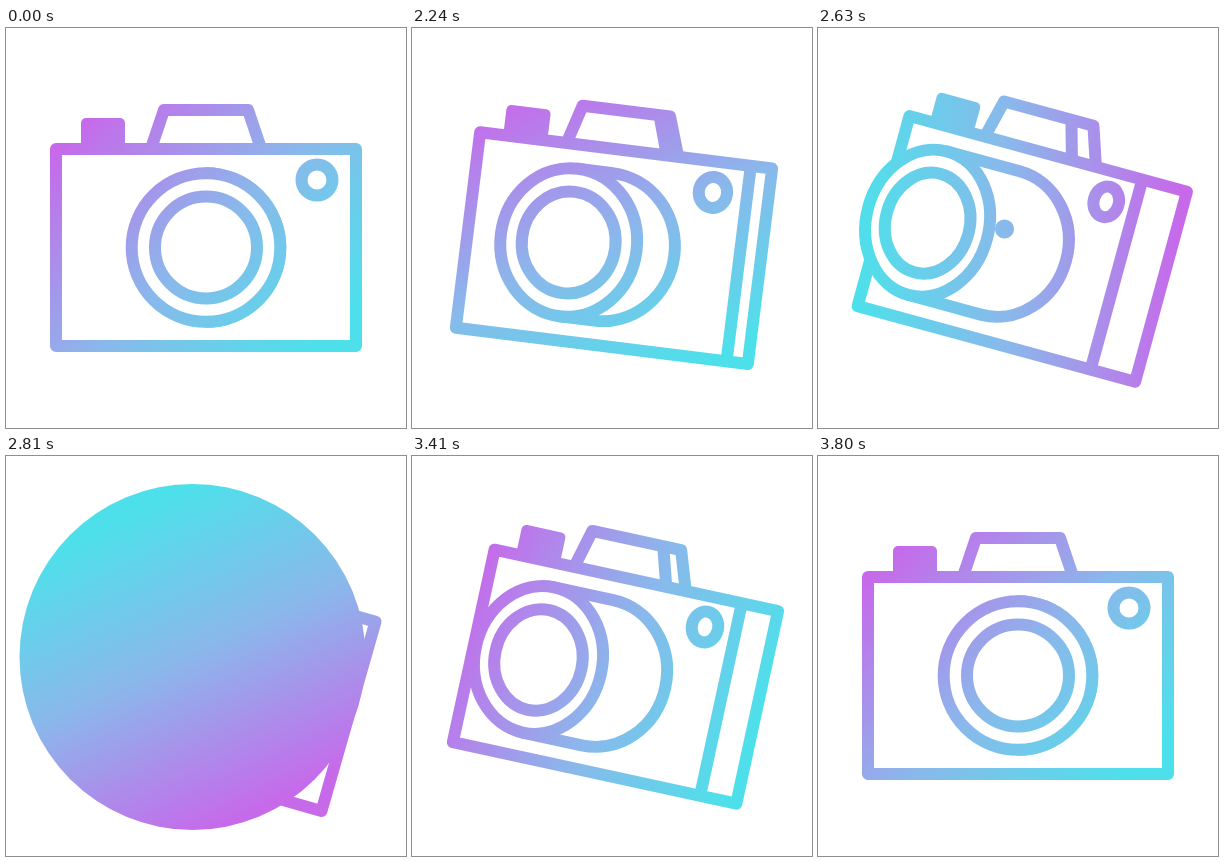
An HTML page for the animation above (3830 ms loop, 400x400 px).

```html
<!DOCTYPE html>
<html lang="en">
<head>
<meta charset="utf-8">
<title>Camera</title>
<style>
html, body { margin: 0; width: 100%; height: 100%; overflow: hidden; background: #fff; }
svg { display: block; width: 100vw; height: 100vh; }
</style>
</head>
<body>
<svg viewBox="0 0 400 400">
  <defs>
    <linearGradient id="tint" gradientUnits="userSpaceOnUse" x1="40" y1="200" x2="360" y2="200">
      <stop offset="0" stop-color="#c66aea"/>
      <stop offset=".53" stop-color="#8ab8eb"/>
      <stop offset="1" stop-color="#4ee0ea"/>
    </linearGradient>
    <mask id="shape" maskUnits="userSpaceOnUse" x="0" y="0" width="400" height="400">
      <g id="camera" fill="#000" stroke="#fff" stroke-width="12" stroke-linejoin="round" stroke-linecap="round">
        <path id="hump"/>
        <rect id="knob" y="-129.5" height="32" rx="5" fill="#fff" stroke="none"/>
        <path id="body"/>
        <ellipse id="finder" cy="-67.5" ry="15.5"/>
        <path id="barrel"/>
        <ellipse id="ring" ry="74.3"/>
        <ellipse id="glass" ry="51"/>
      </g>
      <circle id="flash" cx="186.5" cy="201" fill="#fff"/>
    </mask>
  </defs>
  <rect width="400" height="400" fill="url(#tint)" mask="url(#shape)"/>
</svg>
<script>
const LOOP = 3830, HOLD = 2030, STEP = 30, STEPS = 60;
const FLASH_PEAK = 27, FLASH_SPAN = 7, FLASH_RADIUS = 173;

const part = id => document.getElementById(id);
const set = (id, attrs) => {
  for (const name in attrs) part(id).setAttribute(name, attrs[name]);
};
const clamp = x => Math.min(1, Math.max(0, x));
const smooth = x => x * x * (3 - 2 * x);

// Bezier easing with handles (x1, 0) and (x2, 1)
function ease(x, x1, x2) {
  let low = 0, high = 1;
  for (let i = 0; i < 24; i++) {
    const s = (low + high) / 2, r = 1 - s;
    if (3 * r * r * s * x1 + 3 * r * s * s * x2 + s * s * s < x) low = s;
    else high = s;
  }
  return smooth(low);
}

// turn: 0 faces the viewer, 1 is fully turned to the side
function drawCamera(turn) {
  const mix = (from, change) => from + change * turn;
  const right = mix(150, -6.5), edge = right - 48.5 * turn;
  const face = -24 * turn, front = -103 * turn;

  set('camera', {
    transform: `translate(${mix(200, 4.5)} ${mix(219.5, 1.5)}) rotate(${16 * turn})`
  });
  set('body', {
    d: `M${-right} -98.5H${right}V98.5H${-right}ZM${edge} -98.5V98.5`
  });
  set('hump', {
    d: `M${mix(-55, -11)} -99L${mix(-42, -15)} -137.5H${mix(42, -6)}L${mix(55, -6)} -99` +
       `M${mix(42, -30)} -137.5L${mix(55, -32)} -99`
  });
  set('knob', { x: mix(-125, 2.5), width: mix(44, 1) });
  set('finder', { cx: mix(111, -44.5), rx: mix(15.5, -3) });
  set('barrel', {
    d: `M${front} -74.3H${face}A${mix(74.3, -6.5)} 74.3 0 0 1 ${face} 74.3H${front}Z`
  });
  set('ring', { cx: front, rx: mix(74.3, -13.5) });
  set('glass', { cx: front, rx: mix(51, -9.3) });
}

function render(time) {
  const t = time % LOOP;
  const step = t < HOLD ? 0 : Math.min(STEPS, Math.floor((t - HOLD) / STEP) + 1);
  const half = STEPS / 2;

  drawCamera(ease(Math.min(step, STEPS - step) / half, 0.333, 0.1));

  const spin = 45 + 360 * ease(step / STEPS, 0.333, 0.45);
  set('tint', { gradientTransform: `rotate(${spin} 200 200)` });

  const glow = clamp(1 - Math.abs(step - FLASH_PEAK) / FLASH_SPAN);
  set('flash', { r: FLASH_RADIUS * smooth(glow) });
}

const start = performance.now();
function tick() {
  render(performance.now() - start);
  requestAnimationFrame(tick);
}
tick();
</script>
</body>
</html>
```
